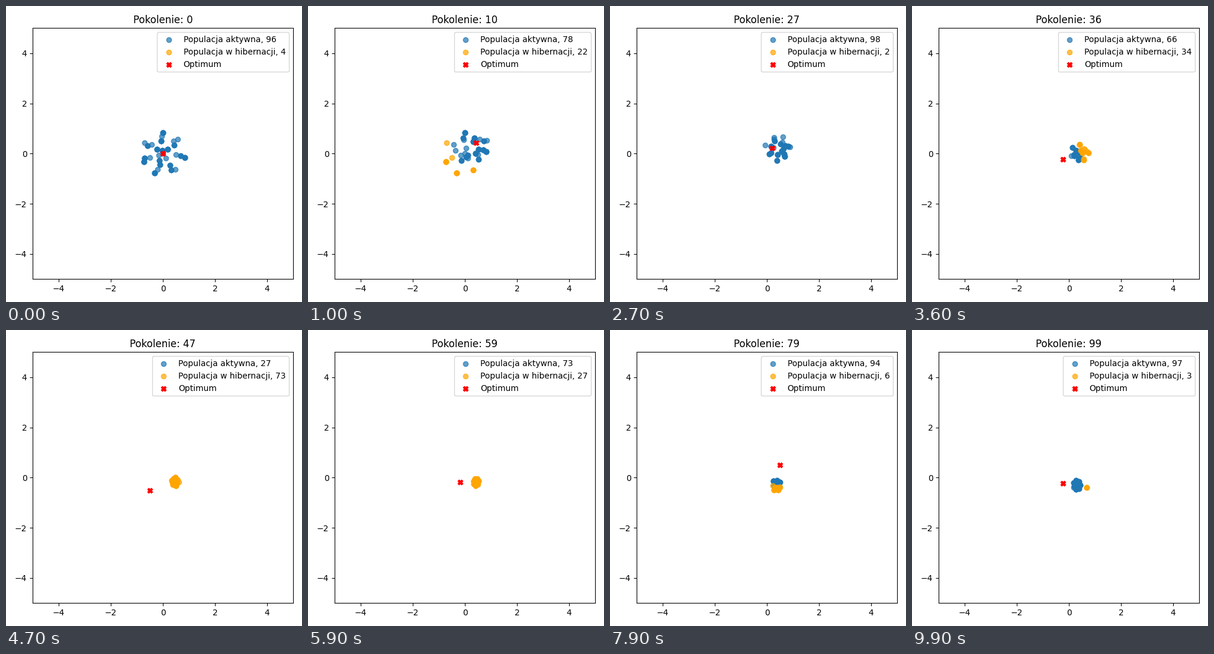
Animation, 500 px wide and 500 px high, one loop 10000 ms. Source, as a matplotlib script:

```python
import random

import matplotlib.pyplot as plt
import numpy as np
from matplotlib.animation import FuncAnimation

GENERATIONS = 100
START_SIZE = 28
rng = random.Random(7)

# Key generations and how the population looks there
KEYS = [0, 10, 27, 47, 59, 66, 79, 99]
SLEEPERS = [4, 22, 2, 73, 27, 7, 6, 3]
SLEEP_RADIUS = [.86, 1, .68, .8, .52, .8, .86, .86]
CENTER_X = [0, .3, .42, .47, .42, .4, .37, .3]
CENTER_Y = [0, .25, .22, -.16, -.17, -.2, -.3, -.29]
WIDTH = [.92, .65, .5, .12, .1, .12, .17, .14]
HEIGHT = [.9, .55, .52, .16, .16, .18, .23, .2]


def at(gen, values):
    return np.interp(gen, KEYS, values)


def spot(i, gen):
    """The i-th position of an even spread over the cloud at a generation."""
    r, angle = np.sqrt(.755 * i % 1), 2 * np.pi * (.57 * i % 1)
    return (at(gen, CENTER_X) + at(gen, WIDTH) * r * np.cos(angle),
            at(gen, CENTER_Y) + at(gen, HEIGHT) * r * np.sin(angle))


def populate():
    """List (x, y, birth, death, copies) for every distinct individual."""
    people = [(*spot(i, 0), 0, rng.randint(4, 20), rng.choice((1, 3, 5)))
              for i in range(START_SIZE)]
    for birth in range(6, GENERATIONS):
        for _ in range(3):
            death = birth + rng.randint(5, 9)
            x, y = spot(len(people), (birth + death) / 2)
            people.append((x, y, birth, death, rng.choice((1, 3, 5))))
    people.append((.68, -.4, 94, GENERATIONS, 3))  # late straggler
    return people


population = populate()


def split(gen, best):
    """Positions of the active and the hibernating individuals."""
    alive = np.array([(x, y) for x, y, birth, death, copies in population
                      if birth <= gen < death for _ in range(copies)])
    far = np.hypot(*(alive - best).T) > at(gen, SLEEP_RADIUS)
    return alive[~far], alive[far]


fig, ax = plt.subplots(figsize=(5, 5), dpi=100)


def draw(gen):
    best = .5 * np.sin(.1 * gen)
    active, asleep = split(gen, best)
    n = round(at(gen, SLEEPERS))
    ax.clear()
    ax.scatter(*active.T, color="tab:blue", alpha=.7,
               label=f"Populacja aktywna, {100 - n}")
    ax.scatter(*asleep.T, color="orange", alpha=.7,
               label=f"Populacja w hibernacji, {n}")
    ax.scatter(best, best, color="red", marker="X", label="Optimum")
    ax.set(xlim=(-5, 5), ylim=(-5, 5), title=f"Pokolenie: {gen}")
    ax.legend(loc="upper right")


draw(0)
fig.tight_layout()
anim = FuncAnimation(fig, draw, frames=GENERATIONS, interval=100,
                     init_func=lambda: None, repeat=True, repeat_delay=0)
plt.show()
```
